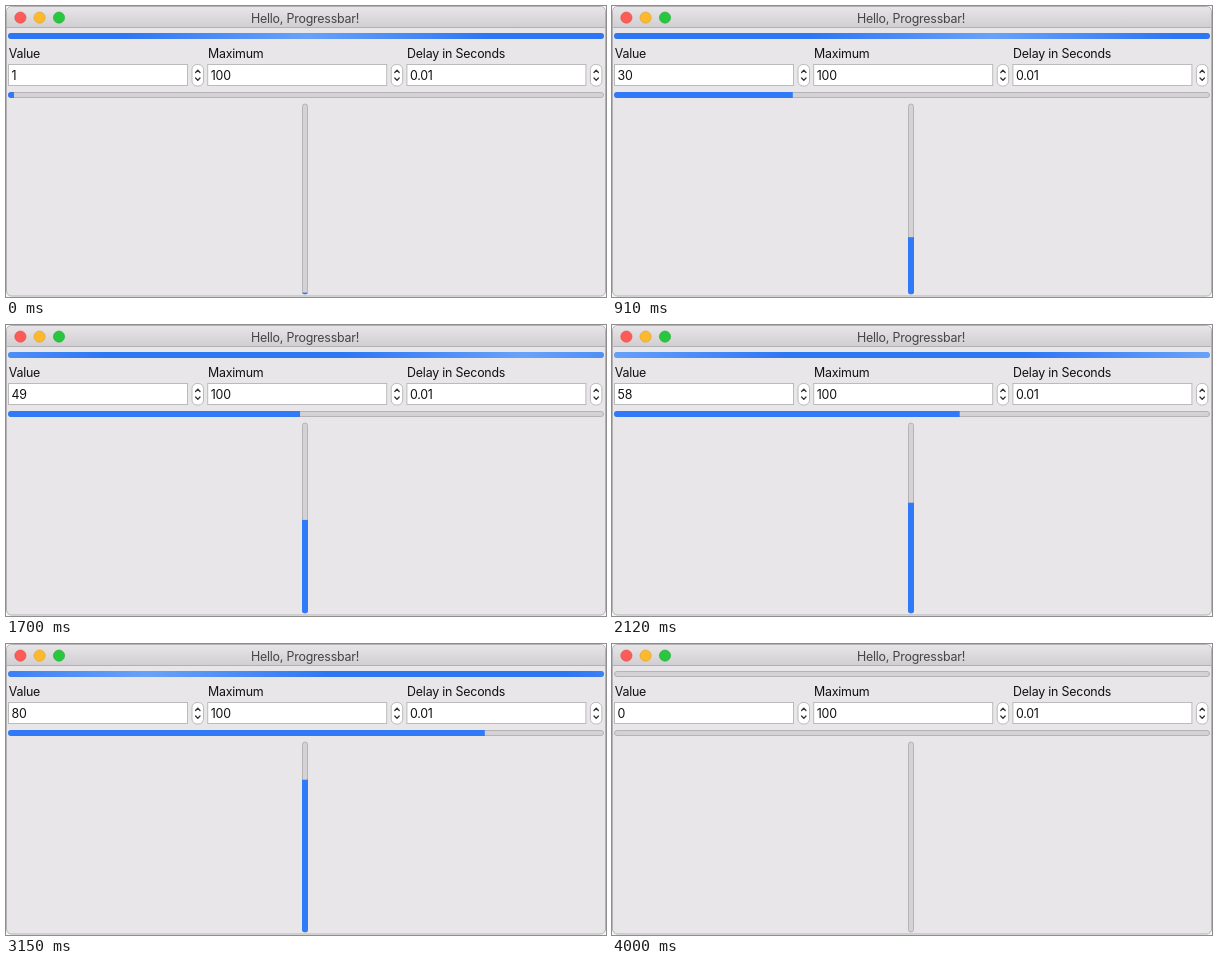
Write an HTML page that moves like this. It is 600 px wide and 291 px high and loops after 4.06 s.

```html
<!DOCTYPE html>
<html lang="en">
<head>
<meta charset="utf-8">
<title>Progressbar</title>
<style>
  html, body { margin: 0; width: 100%; height: 100%; overflow: hidden; background: #f4f4f4; }
  svg { display: block; width: 600px; height: 291px; }
  text { font: 12.4px Inter, "Open Sans", sans-serif; letter-spacing: -.2px; fill: #111; }
  .track { fill: #d4d2d4; stroke: #b5b3b5; }
  .fill { fill: #307af7; }
  .box { fill: #fff; stroke: #bcbabc; }
  .arrow { fill: none; stroke: #333; stroke-width: 1.3; stroke-linecap: round; stroke-linejoin: round; }
</style>
</head>
<body>
<svg viewBox="0 0 600 291">
  <defs>
    <linearGradient id="titleFill" x2="0" y2="1">
      <stop stop-color="#e7e5e7"/><stop offset="1" stop-color="#d0ced0"/>
    </linearGradient>
    <linearGradient id="glow" gradientUnits="userSpaceOnUse" x1="0" x2="600" spreadMethod="repeat">
      <stop offset=".2" stop-color="#2e77f4"/>
      <stop offset=".5" stop-color="#68a2f8"/>
      <stop offset=".8" stop-color="#2e77f4"/>
    </linearGradient>
    <clipPath id="acrossClip"><rect x="2" y="86" width="596" height="6" rx="3"/></clipPath>
    <clipPath id="upClip"><rect x="296" y="97.5" width="6" height="191" rx="3"/></clipPath>
  </defs>

  <rect x=".5" y=".5" width="599" height="289.5" rx="5" fill="#e8e6e8" stroke="#b3b1b3"/>
  <path d="M1 21.5V6Q1 1 6 1H594Q599 1 599 6V21.5Z" fill="url(#titleFill)"/>
  <path d="M1 21.5H599" stroke="#b2b0b2"/>
  <g stroke-width=".6">
    <circle cx="14.4" cy="11.6" r="5.6" fill="#fc5b57" stroke="#df4744"/>
    <circle cx="33.6" cy="11.6" r="5.6" fill="#fdb92e" stroke="#dd9f25"/>
    <circle cx="53" cy="11.6" r="5.6" fill="#29c740" stroke="#20a932"/>
  </g>
  <text x="299" y="16.5" text-anchor="middle" style="fill:#464446">Hello, Progressbar!</text>

  <rect class="track" x="2.5" y="27.5" width="595" height="5" rx="2.5"/>
  <rect id="busy" x="2" y="27" width="596" height="6" rx="3" fill="url(#glow)"/>
  <g id="fields"></g>

  <rect class="track" x="2.5" y="86.5" width="595" height="5" rx="2.5"/>
  <g clip-path="url(#acrossClip)"><rect id="across" class="fill" x="2" y="86" height="6"/></g>
  <rect class="track" x="296.5" y="98" width="5" height="190" rx="2.5"/>
  <g clip-path="url(#upClip)"><rect id="up" class="fill" x="296" width="6"/></g>
</svg>
<script>
  const LOOP = 4060, RESET = 4000;
  // time in ms, counter value, centre of the moving highlight
  const KEYS = [
    [0, 1, 300], [520, 21, 315], [1270, 40, 440], [2120, 58, 595],
    [2700, 70, 655], [3640, 92, 835], [3940, 100, 890], [RESET, 100, 900]
  ];
  const $ = id => document.getElementById(id);
  const set = (id, attrs) => {
    for (const key in attrs) $(id).setAttribute(key, attrs[key]);
  };

  $("fields").innerHTML = [["Value", 1], ["Maximum", 100], ["Delay in Seconds", 0.01]]
    .map(([label, value], i) => `<g transform="translate(${i * 199.2})">
      <text x="2.7" y="52">${label}</text>
      <rect class="box" x="2.5" y="58.5" width="179" height="21"/>
      <text x="5.5" y="74" id="entry${i}">${value}</text>
      <rect class="box" x="186" y="58.5" width="11.5" height="21.5" rx="5"/>
      <path class="arrow" d="M189.6 66.5l2.2-2.4 2.2 2.4M189.6 72l2.2 2.4 2.2-2.4"/>
    </g>`).join("");

  function at(t, column) {
    const i = Math.max(1, KEYS.findIndex(key => key[0] >= t));
    const a = KEYS[i - 1], b = KEYS[i];
    return a[column] + (b[column] - a[column]) * (t - a[0]) / (b[0] - a[0]);
  }

  function draw(t) {
    const running = t < RESET;
    const value = running ? Math.floor(at(t, 1) + 1e-6) : 0;
    $("entry0").textContent = value;
    set("across", { width: value * 5.96 });
    set("up", { y: 288.5 - value * 1.91, height: value * 1.91 });
    set("busy", { visibility: running ? "visible" : "hidden" });
    if (running) {
      const centre = at(t, 2);
      set("glow", { x1: centre - 300, x2: centre + 300 });
    }
  }

  const start = performance.now();
  function tick() {
    draw((performance.now() - start) % LOOP);
    requestAnimationFrame(tick);
  }
  tick();
</script>
</body>
</html>
```
